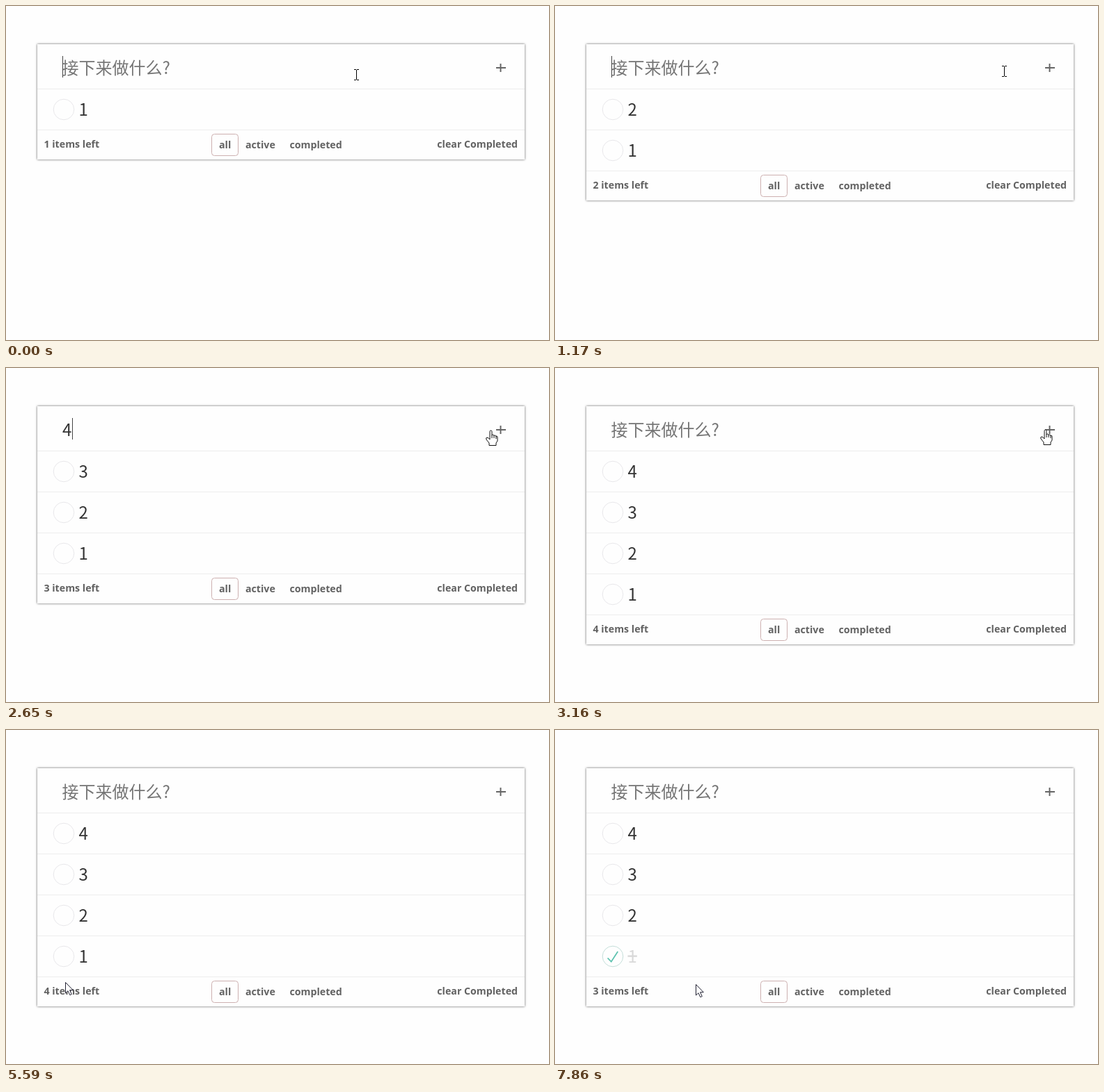
Animation, 780 px wide and 481 px high, one loop 8000 ms. Source, as an HTML page:

```html
<!DOCTYPE html>
<html lang="zh">
<head>
<meta charset="utf-8">
<title>Todo list</title>
<style>
html, body { margin: 0; width: 100%; height: 100%; overflow: hidden; background: #fefefe; }
#card { position: absolute; left: 45px; top: 55px; width: 700px; box-shadow: 0 0 3px #555; }
svg { position: absolute; left: 0; top: 0; }
.big { font: 24px "Noto Sans CJK SC", "Noto Sans CJK", "Open Sans", sans-serif; }
.small { font: bold 14.2px "Open Sans", sans-serif; fill: #626262; }
.line { stroke: #ededed; }
.plus { fill: none; stroke: #666; stroke-width: 2; }
</style>
</head>
<body>
<div id="card"></div>
<svg id="view" width="780" height="481"></svg>
<script>
const LOOP = 8000, ROW = 59, TOP = 120, CHECKED = 6190;
const card = document.getElementById('card');
const view = document.getElementById('view');

// Each round: focus the field, type a digit, click the plus
const rounds = [0, 1020, 2130].map((focus, i) =>
  ({ text: i + 2, focus, type: focus + 270, add: focus + 720, plus: [711 - 3 * i, 87 + i] }));

// Pointer moves: start, end, x, y
const moves = [
  ...rounds.flatMap(r => [[r.focus + 200, r.focus + 620, ...r.plus], [r.focus + 840, r.focus + 1080, 645, 94]])
    .slice(0, -1),
  [3200, 4050, 418, 340], [4050, 4360, 351, 326],
  [4400, 4800, 190, 246], [4800, 5280, 82, 350],
  [5560, 5590, 85, 363], [5600, 5890, 86, 334],
  [6300, 6740, 104, 376], [6740, 7200, 150, 366], [7820, 7860, 202, 366]
];

const cursors = {
  beam: '<path d="M-3 -7.5H0M1 -7.5H4M.5 -7V7M-3 7.5H0M1 7.5H4" stroke="#000" fill="none"/>',
  hand: `<path d="M-2 13V1.5Q-2 0 -.5 0T1 1.5V7Q1 6 2.5 6T4 8Q4 7 5.5 7T7 9Q7 8 8 8T9 10V15L7 18V21.5H-3V18
    L-7 13Q-8 10 -6 10T-2 13ZM1 7V11M4 8V11M7 9V12" fill="#fff" stroke="#111"/>`,
  arrow: '<path d="M.5 .5V16L4 12.7L6.8 18.7L9.3 17.6L6.6 11.7H11.3Z" fill="#fff" stroke="#223"/>'
};

const text = (x, y, cls, str, extra = '') => `<text x="${x}" y="${y}" class="${cls}" ${extra}>${str}</text>`;

function pointerAt(t) {
  let x = 503, y = 99;
  for (const [start, end, toX, toY] of moves) {
    const k = Math.min(1, Math.max(0, (t - start) / (end - start)));
    const ease = k * k * (3 - 2 * k);
    x += (toX - x) * ease;
    y += (toY - y) * ease;
  }
  return [Math.round(x), Math.round(y)];
}

function field(t) {
  const round = rounds.find(r => t < r.add);
  const typed = round && t >= round.type;
  const caret = round && t >= round.focus && t < round.type + 300;
  return (typed ? text(81, 98, 'big', round.text, 'fill="#333"')
                : text(80.5, 98, 'big', '接下来做什么?', 'fill="#757575"'))
    + (caret ? `<path d="M${typed ? 95.5 : 81.5} 72V103" stroke="#444"/>` : '')
    + '<path class="plus" d="M704 89H718M710.5 83V95"/>';
}

function row(label, i, hover, t) {
  const y = TOP + ROW * i, done = label === 1 && t >= CHECKED;
  const shade = done ? 51 + 166 * Math.min(1, (t - CHECKED) / 400) : 51;
  return `<path class="line" d="M45 ${y - .5}H745"/>
    <g transform="translate(68.2 ${y + 14.2}) scale(.296)">
      <circle cx="50" cy="50" r="50" fill="none" stroke="${done ? '#bddad5' : '#e6e4e8'}" stroke-width="3"/>
      ${done ? '<path fill="#5dc2af" d="M72 25L42 71 27 56l-4 4 20 20 34-52z"/>' : ''}
    </g>`
    + text(104.5, y + 38, 'big', label, `fill="rgb(${shade},${shade},${shade})"`
      + (done ? ' text-decoration="line-through"' : ''))
    + (hover ? `<path d="M709.5 ${y + 23.5}l10 10m0 -10l-10 10" stroke="#cc9a9a" stroke-width="3"/>` : '');
}

function footer(y, left) {
  return `<path class="line" d="M45 ${y - .5}H745"/>
    <rect x="295.5" y="${y + 5.5}" width="38" height="31" rx="4" fill="none" stroke="#cdb0b0"/>`
    + text(54.5, y + 25, 'small', left + ' items left')
    + text(306, y + 26, 'small', 'all')
    + text(344, y + 26, 'small', 'active')
    + text(407.5, y + 26, 'small', 'completed')
    + text(735, y + 25, 'small', 'clear Completed', 'text-anchor="end"');
}

function draw(now) {
  const t = now % LOOP;
  const count = 1 + rounds.filter(r => t >= r.add).length;
  const bottom = TOP + ROW * count;
  const [x, y] = pointerAt(t);
  const over = Math.floor((y - TOP) / ROW);
  const cursor = y >= TOP ? 'arrow' : x > 690 ? 'hand' : 'beam';

  card.style.height = bottom + 42 - 55 + 'px';
  let out = field(t);
  for (let i = 0; i < count; i++) out += row(count - i, i, i === over, t);
  out += footer(bottom, count - (t >= CHECKED));
  view.innerHTML = out + `<g transform="translate(${x} ${y})">${cursors[cursor]}</g>`;
  requestAnimationFrame(draw);
}
draw(0);
</script>
</body>
</html>
```
